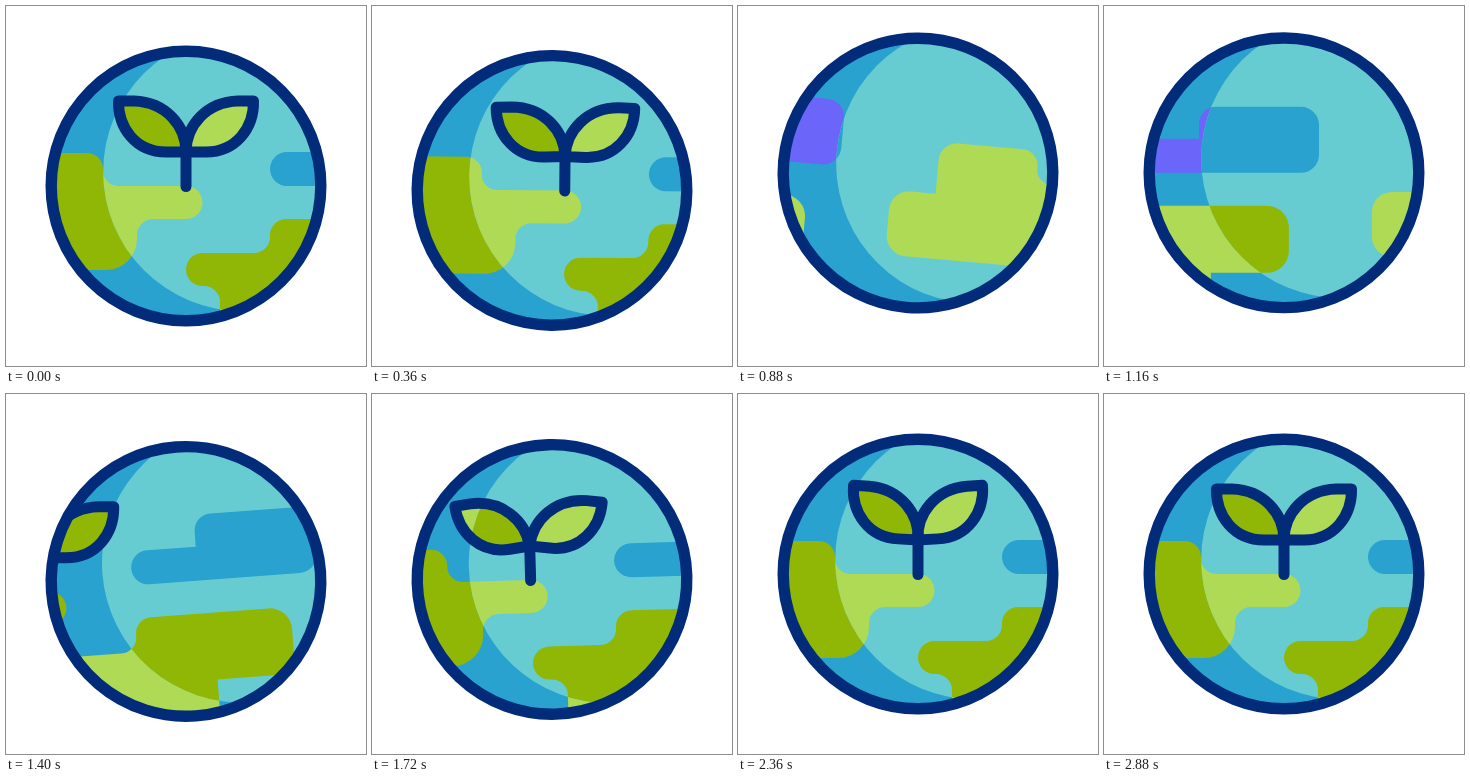
Animation, 360 px wide and 360 px high, one loop 3 s. Source, as an HTML page:

```html
<!DOCTYPE html>
<html lang="en">
<head>
<meta charset="utf-8">
<title>Green planet</title>
<style>
  html, body { margin: 0; width: 100%; height: 100%; overflow: hidden; background: #fff; }
  svg { display: block; width: 100%; height: 100%; }
  .shade { --sea: #2aa2cf; --a: #90b606; --b: #afda55; --c: #6b66f9; }
  .light { --sea: #67ccd2; --a: #afda55; --b: #90b606; --c: #2aa2cf; }
  .sea { fill: var(--sea); }
  .a { fill: var(--a); }
  .b { fill: var(--b); }
  .c { fill: var(--c); }
  .line { fill: none; stroke: #022c7a; stroke-width: 11; stroke-linecap: round; stroke-linejoin: round; }
</style>
</head>
<body>
<svg viewBox="0 0 360 360">
  <defs>
    <clipPath id="disc"><circle cx="180" cy="180" r="134"/></clipPath>
    <clipPath id="lit"><circle cx="236.5" cy="165.8" r="139.3"/></clipPath>
  </defs>
  <g id="globe">
    <g clip-path="url(#disc)">
      <g class="shade"></g>
      <g class="light" clip-path="url(#lit)"></g>
      <g class="line"></g>
    </g>
    <circle cx="180" cy="180" r="134.8" fill="none" stroke="#022c7a" stroke-width="11.4"/>
  </g>
</svg>
<script>
const LOOP = 3000, WRAP = 550;
const $ = s => document.querySelector(s);

const leaf = (side, fill = '') =>
  `<path class="leaf ${fill}" data-side="${side}" d="M0 -1C0 -27 -20 -51 -52 -52H-67.5C-68 -25 -50 -1 -20 -1Z"/>`;

const land = `
  <path class="a" d="M-27 199H-2V165a18 18 0 0 1 18-18H81a16 16 0 0 1 16 16V165a15 15 0 0 0 15 15H180
    a16.5 16.5 0 0 1 0 33H147a16 16 0 0 0-16 16V233a31 31 0 0 1-31 31H-27a20 20 0 0 1-20-20V219a20 20 0 0 1 20-20Z"/>
  <path class="b" d="M196.5 247H248a16 16 0 0 0 16-16V229a16 16 0 0 1 16-16H398a22 22 0 0 1 22 22V258
    a22 22 0 0 1-22 22H342V330H214V296a16 16 0 0 0-16-16H196.5a16.5 16.5 0 0 1 0-33Z"/>
  <path class="c" d="M281 146H330V131a17 17 0 0 1 17-17H432a18 18 0 0 1 18 18V162a18 18 0 0 1-18 18H281a17 17 0 0 1 0-34Z"/>`
  + leaf(1, 'b') + leaf(-1, 'a');
const outline = '<path d="M180 146V180.5"/>' + leaf(1) + leaf(-1);

// Two copies side by side make the map wrap around.
const twice = art => [0, -WRAP].map(x => `<g class="map" data-shift="${x}">${art}</g>`).join('');
const ground = '<rect class="sea" width="360" height="360"/>' + twice(land);
$('.shade').innerHTML = $('.light').innerHTML = ground;
$('.line').innerHTML = twice(outline);

const globe = $('#globe');
const maps = document.querySelectorAll('.map');
const leaves = document.querySelectorAll('.leaf');

// Steady turn with an equal ramp at both ends.
function turn(t, from = 215, to = 1910, ramp = 0.2) {
  const u = Math.min(1, Math.max(0, (t - from) / (to - from)));
  const half = v => v < ramp ? v * v / (2 * ramp * (1 - ramp)) : (v - ramp / 2) / (1 - ramp);
  return WRAP * (u < 0.5 ? half(u) : 1 - half(1 - u));
}

// Cosine swing from one [time, value] turning point to the next.
function swing(t, ...points) {
  let [t0, v] = points[0];
  for (const [t1, v1] of points.slice(1)) {
    const u = Math.min(1, Math.max(0, (t - t0) / (t1 - t0)));
    v += (v1 - v) * (1 - Math.cos(Math.PI * u)) / 2;
    if (u < 1) break;
    t0 = t1;
  }
  return v;
}

function draw(t) {
  const x = turn(t);
  const bob = swing(t, [220, 0], [560, 12], [1013, -19], [1530, 12], [1890, 0]);
  const tilt = swing(t, [220, 0], [940, 5.2], [1360, -4.3], [1980, 0]);
  const droop = swing(t, [220, 0], [640, 8], [1050, 0], [1700, 7.5], [2250, -3.5], [2860, 0]);
  globe.setAttribute('transform', `translate(0 ${bob}) rotate(${tilt} 180 180)`);
  for (const m of maps) m.setAttribute('transform', `translate(${x + +m.dataset.shift} 0)`);
  for (const l of leaves) {
    l.setAttribute('transform', `translate(180 147) scale(${l.dataset.side} 1) rotate(${-droop})`);
  }
}

const start = performance.now();
function tick() {
  draw((performance.now() - start) % LOOP);
  requestAnimationFrame(tick);
}
tick();
</script>
</body>
</html>
```
